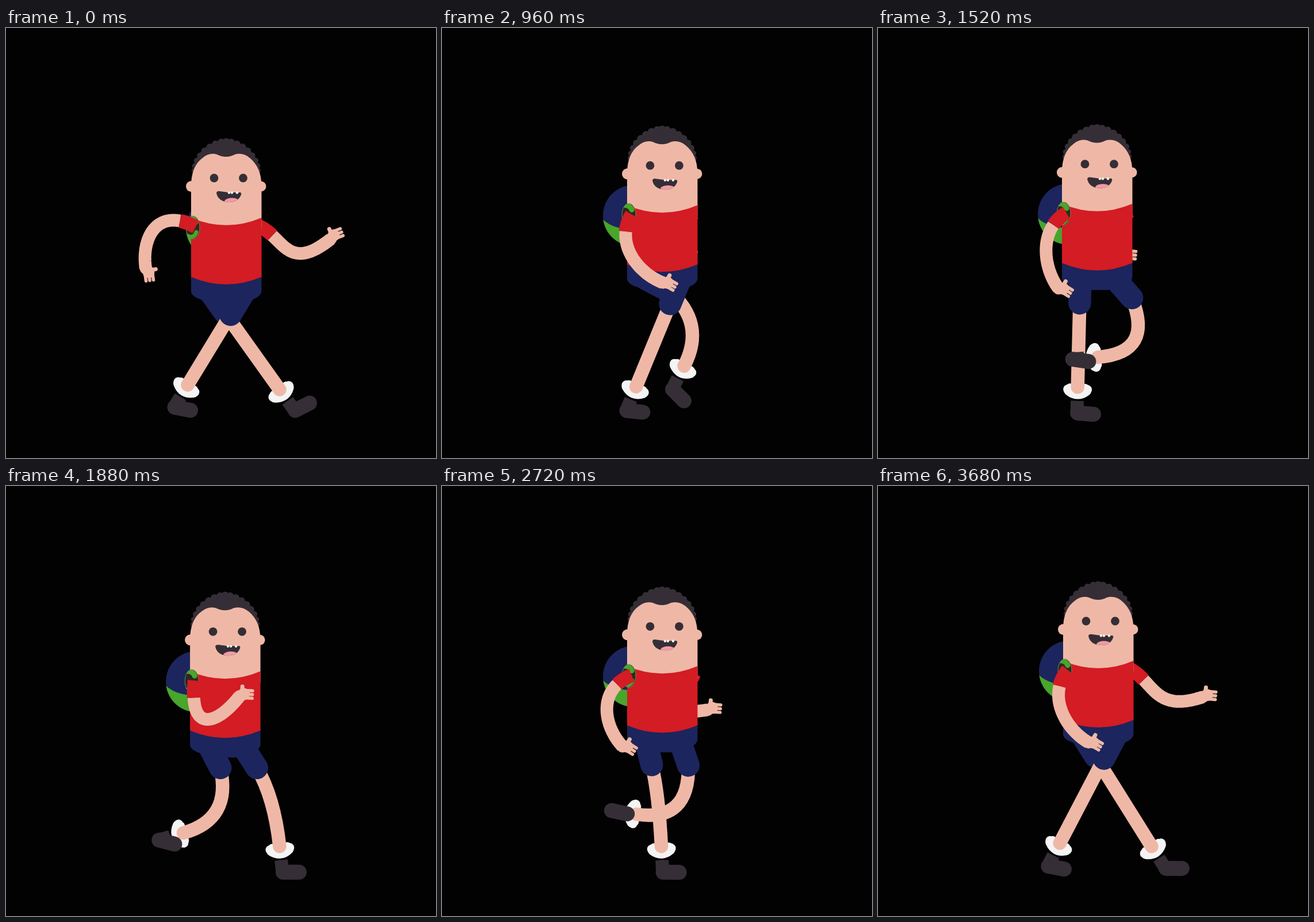
Animation, 748 px wide and 748 px high, one loop 4.32 s. Source, as an HTML page with a canvas:

```html
<!DOCTYPE html>
<html lang="en">
<head>
<meta charset="utf-8">
<title>Walking boy</title>
<style>
  html, body { margin: 0; width: 100%; height: 100%; overflow: hidden; background: #020202; }
  canvas { display: block; width: 748px; height: 748px; }
</style>
</head>
<body>
<canvas id="stage" width="748" height="748"></canvas>
<script>
const ctx = document.getElementById('stage').getContext('2d');
const STEP = 40, CYCLE = 1240, LAST = 3680, LOOP = 4320;
const FAR_DELAY = 0.54; // far leg trails the near one by this share of a cycle
const SKIN = '#efb8a6', RED = '#d31c23', NAVY = '#1c255d', GREEN = '#47a62b',
      DARK = '#352e36', WHITE = '#f4f4f4';

// One stride, shared by both legs: phase, ankle x, ankle y, foot tilt.
const stride = [
  [0, 476, 629, -27], [0.19, 384, 627, 0], [0.266, 317, 622, 8], [0.46, 316, 621, 11],
  [0.58, 300, 578, 18], [0.653, 338, 571, 12], [0.69, 386, 573, 8], [0.774, 421, 588, 45],
  [0.806, 458, 586, 0], [0.911, 481, 598, 9], [0.968, 476, 627, 0]
];
// Near hand swing: phase, wrist x, wrist y, hand angle.
const swing = [
  [0, 243, 418, 82], [0.19, 314, 453, 32], [0.23, 314, 453, 32],
  [0.452, 408, 357, 0], [0.774, 384, 443, 30], [0.968, 366, 446, 30]
];

const rad = deg => deg * Math.PI / 180;
function ease(p, from, to) {
  const u = Math.max(0, Math.min(1, (p - from) / (to - from)));
  return u * u * (3 - 2 * u);
}

// Smooth path through key points that never overshoots.
function follow(keys, at) {
  let i = 0;
  while (i < keys.length - 2 && at >= keys[i + 1][0]) i++;
  const slope = (k, c) => keys[k] && keys[k + 1]
    ? (keys[k + 1][c] - keys[k][c]) / (keys[k + 1][0] - keys[k][0]) : 0;
  const tangent = (k, c) => {
    const a = slope(k - 1, c), b = slope(k, c);
    return a * b > 0 ? 2 * a * b / (a + b) : 0;
  };
  const span = keys[i + 1][0] - keys[i][0];
  const u = Math.min(1, (at - keys[i][0]) / span), v = 1 - u;
  return [1, 2, 3].map(c =>
    v * v * (1 + 2 * u) * keys[i][c] + u * u * (3 - 2 * u) * keys[i + 1][c]
    + span * u * v * (v * tangent(i, c) - u * tangent(i + 1, c)));
}

function fill(d, color) {
  ctx.fillStyle = color;
  ctx.fill(new Path2D(d));
}
function oval(x, y, rx, ry, color) {
  ctx.fillStyle = color;
  ctx.beginPath();
  ctx.ellipse(x, y, rx, ry, 0, 0, Math.PI * 2);
  ctx.fill();
}
const disc = (x, y, r, color) => oval(x, y, r, r, color);
function curve(d, width, color) {
  ctx.strokeStyle = color;
  ctx.lineWidth = width;
  ctx.lineCap = 'round';
  ctx.stroke(new Path2D(d));
}
function line(points, width, color, cap = 'round') {
  ctx.strokeStyle = color;
  ctx.lineWidth = width;
  ctx.lineCap = cap;
  ctx.lineJoin = 'round';
  ctx.beginPath();
  points.forEach(([x, y]) => ctx.lineTo(x, y));
  ctx.stroke();
}
function placed(x, y, angle, draw) {
  ctx.save();
  ctx.translate(x, y);
  ctx.rotate(angle);
  draw();
  ctx.restore();
}
function clipped(path, draw) {
  ctx.save();
  ctx.clip(path);
  draw();
  ctx.restore();
}

// Point at a share of the way from a to b, pushed sideways.
function between(a, b, share, side) {
  const dx = b[0] - a[0], dy = b[1] - a[1], d = Math.hypot(dx, dy);
  return [a[0] + dx * share + dy / d * side, a[1] + dy * share - dx / d * side];
}
// The closer the two ends of a limb, the more it bends.
const slack = (a, b, reach) =>
  Math.sqrt(Math.max(0, reach * reach - (a[0] - b[0]) ** 2 - (a[1] - b[1]) ** 2));

function drawLeg(hip, [ax, ay, tilt]) {
  const ankle = [ax, ay], bend = 0.75 * slack(hip, ankle, 188);
  const aim = between(hip, ankle, 0.5, bend);
  const d = Math.hypot(ax - hip[0], ay - hip[1]);
  const knee = between(hip, ankle, 0.5 + 0.45 * bend / d, bend);
  const thigh = Math.atan2(aim[1] - hip[1], aim[0] - hip[0]);
  const hem = [hip[0] + 45 * Math.cos(thigh), hip[1] + 45 * Math.sin(thigh)];
  const shin = Math.atan2(knee[0] - ax, ay - knee[1]);

  placed(ax, ay, shin, () => {
    curve('M-15 6Q0 18 15 6', 18, WHITE);
    [-1, 1].forEach(s => { disc(s * 17, 4, 8, WHITE); disc(s * 13, 2, 8, WHITE); });
  });
  curve(`M${hem}Q${knee} ${ankle}`, 23.5, SKIN);
  placed(ax, ay, shin, () => {
    line([[0, 24], [0, 45]], 23, DARK, 'butt');
    placed(0, 45, rad(tilt) - shin, () => line([[1, 0], [29, 0]], 26, DARK));
  });
  line([hip, hem], 39.5, NAVY);
}

function drawArm(shoulder, [wx, wy, turn], upper, lower) {
  const wrist = [wx, wy], bend = 0.64 * slack(shoulder, wrist, 145);
  const ends = [shoulder, between(shoulder, wrist, upper[0], -bend * upper[1]),
                between(shoulder, wrist, lower[0], -bend * lower[1]), wrist];
  const pts = [], sleeve = [];
  let len = 0;
  for (let i = 0; i <= 40; i++) {
    const t = i / 40, s = 1 - t, w = [s * s * s, 3 * s * s * t, 3 * s * t * t, t * t * t];
    const q = [0, 1].map(c => ends.reduce((sum, e, k) => sum + e[c] * w[k], 0));
    if (i) len += Math.hypot(q[0] - pts[i - 1][0], q[1] - pts[i - 1][1]);
    pts.push(q);
    if (len <= 33) sleeve.push(q);
  }
  line(pts.slice(sleeve.length - 1), 22, SKIN, 'butt');
  placed(wx, wy, rad(turn), () => {
    disc(0, 0, 10.5, SKIN);
    disc(7, -4, 10.5, SKIN);
    [-10.5, -4, 2.5].forEach(y => line([[8, y], [22, y]], 5.5, SKIN));
    line([[4, -6], [4, -17]], 7, SKIN);
  });
  line(sleeve, 24, RED, 'butt');
}

function drawPack(x) {
  const ball = new Path2D();
  ball.arc(x, 348, 53, 0, Math.PI * 2);
  clipped(ball, () => {
    disc(x, 348, 54, NAVY);
    fill(`M${x - 54} 354Q${x - 36} 372 ${x} 372V402H${x - 54}Z`, GREEN);
  });
}

function drawHead() {
  disc(322.5, 275.5, 9.5, SKIN);
  disc(443.5, 275.5, 9, SKIN);
  fill('M325 252C325 222 350 196 383 196S441 222 441 252Z', DARK);
  for (let i = 0; i <= 16; i++) {
    const a = Math.PI * i / 16, c = Math.cos(a), h = Math.sin(a);
    disc(383 - 56 * Math.sign(c) * Math.abs(c) ** 1.15, 248 - 50 * h ** 1.1, 4 + 2.5 * h, DARK);
  }
  fill('M322 350V275C322 252 329 235 342 226Q354 216 367 220Q383 228 398 220' +
       'Q412 216 424 226C437 237 444.500 252 444.500 275V350Z', SKIN);
  disc(362, 261, 7.4, DARK);
  disc(412.5, 261, 7.4, DARK);
  const mouth = 'M366 287Q367 283 372 284L387 286H407Q410 286 409 290Q404 303 388 303Q369 302 366 287Z';
  fill(mouth, DARK);
  clipped(new Path2D(mouth), () => oval(393, 302, 13, 6.5, '#ee9ba6'));
  [388, 393, 402].forEach(x => disc(x, 286.5, 2.2, WHITE));
}

function drawTorso() {
  fill('M322 425H444.500V458Q444 466 430 472L403 480H365L338 472Q322 466 322 458Z', NAVY);
  fill('M322 330Q383 356 444.500 330V433Q383 459 322 433Z', RED);
}

function drawStrap() {
  const ring = new Path2D();
  ring.ellipse(325, 347, 12, 20, 0, 0, Math.PI * 2);
  clipped(ring, () => {
    disc(325, 347, 20, '#2c2a20');
    curve('M318 330Q327 330 330 338', 9, GREEN);
    curve('M317 362Q328 366 331 355', 7, GREEN);
  });
  ctx.strokeStyle = '#86925c';
  ctx.lineWidth = 0.8;
  ctx.stroke(ring);
}

function render(ms) {
  const p = Math.min(LAST, Math.floor((ms % LOOP) / STEP) * STEP) % CYCLE;
  const phase = p / CYCLE;
  const dx = -2 * (ease(p, 240, 280) - ease(p, 600, 900));
  const dy = -41 * ease(p, 100, 420) + 36 * ease(p, 440, 680) - 21 * ease(p, 760, 1040);
  const reach = 1 - ease(p, 100, 340) + ease(p, 900, 1180);
  const farHand = [400 + 165 * reach, 403 - 36 * reach, 27 * ease(p, 0, 200) - 22];
  const onBody = draw => placed(dx, dy, 0, draw);

  ctx.fillStyle = '#020202';
  ctx.fillRect(0, 0, 748, 748);
  onBody(() => drawPack(366 - 33 * ease(p, 0, 240)));
  drawArm([438 + dx, 344 + dy], farHand, [0.36, 0.2], [0.5, 1.75]);
  drawLeg([354 + dx, 458 + dy], follow(stride, phase));
  drawLeg([414 + dx, 460 + dy], follow(stride, (phase + 1 - FAR_DELAY) % 1));
  onBody(() => { drawHead(); drawTorso(); drawStrap(); });
  drawArm([330 + dx, 346 + dy], follow(swing, phase), [0.25, 1.2], [0.75, 0.8]);
}

const start = performance.now();
function tick() {
  render(performance.now() - start);
  requestAnimationFrame(tick);
}
tick();
</script>
</body>
</html>
```
